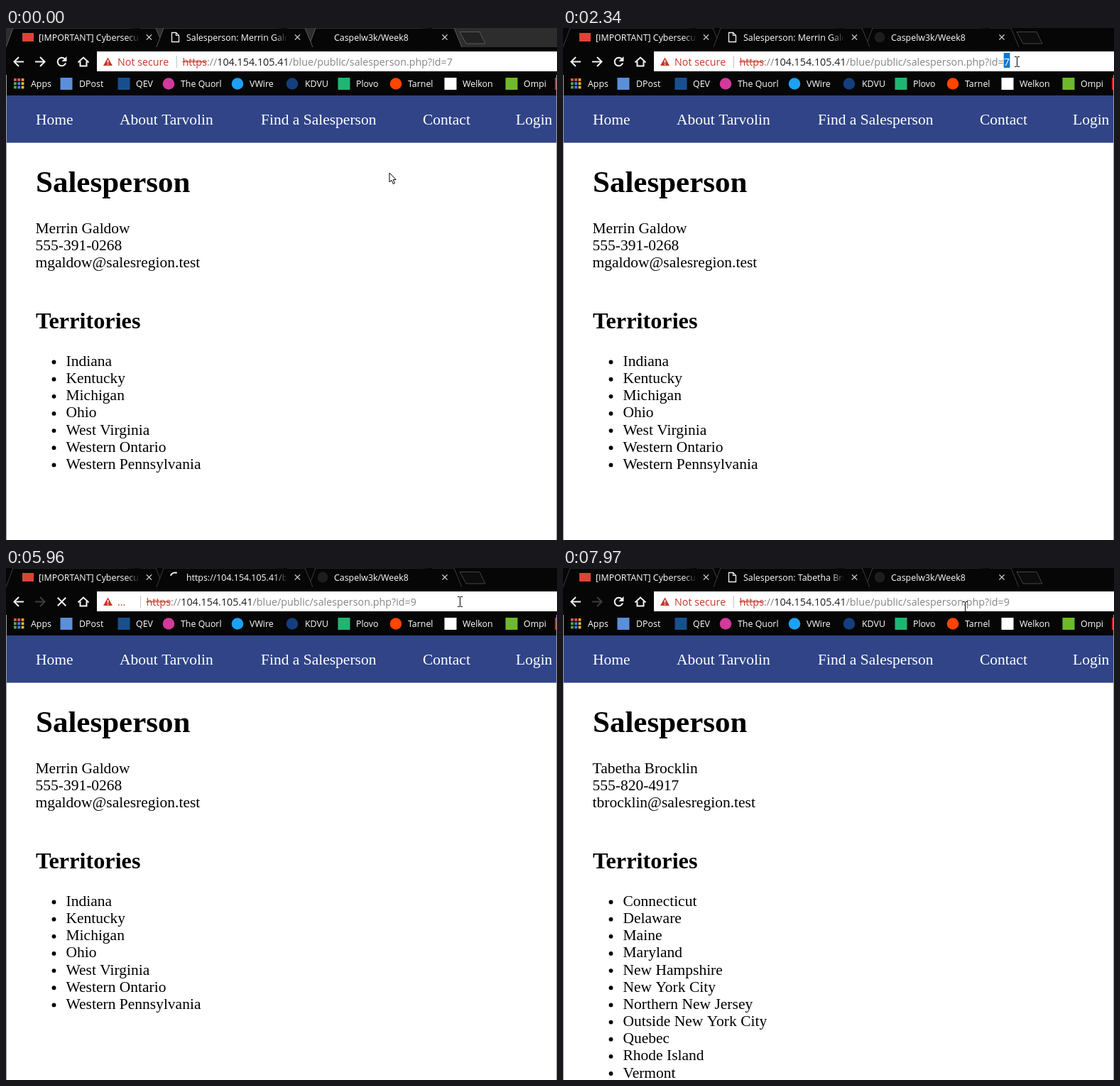
An HTML page with a canvas for the animation above (8000 ms loop, 776 by 721 pixels).

```html
<!DOCTYPE html>
<html lang="en">
<head>
<meta charset="utf-8">
<style>
html, body { margin: 0; width: 100%; height: 100%; overflow: hidden; background: #fff; }
canvas { display: block; }
</style>
</head>
<body>
<canvas width="776" height="721"></canvas>
<script>
const ctx = document.querySelector('canvas').getContext('2d');
const LOOP = 8000, W = 776, H = 721;
const UI = '"Open Sans", sans-serif', SERIF = '"Liberation Serif", serif';
const BLUE = '#0078d7', RED = '#c5392b', DARK = '#060606';

// Moments at which the state changes, in ms
const T = { focus: 1940, digit: 2340, typed: 4330, enter: 5550, chip: 5930, title: 6360, page: 6520, loaded: 7150 };

const people = [
  { name: 'Merrin Galdow', phone: '555-391-0268', mail: 'mgaldow@salesregion.test',
    places: ['Indiana', 'Kentucky', 'Michigan', 'Ohio', 'West Virginia', 'Western Ontario', 'Western Pennsylvania'] },
  { name: 'Tabetha Brocklin', phone: '555-820-4917', mail: 'tbrocklin@salesregion.test',
    places: ['Connecticut', 'Delaware', 'Maine', 'Maryland', 'New Hampshire', 'New York City', 'Northern New Jersey',
      'Outside New York City', 'Quebec', 'Rhode Island', 'Vermont'] }
];
const nav = [['Home', 42], ['About Tarvolin', 160], ['Find a Salesperson', 359], ['Contact', 587], ['Login', 718]];
// label, text x, icon centre x, icon colour, round icon
const bookmarks = [
  ['DPost', 103, 85, '#5b8fd9', 0], ['QEV', 183, 166, '#17508f', 0], ['The Quorl', 246, 229, '#d23a9b', 1],
  ['VWire', 343, 326, '#1da1f2', 1], ['KDVU', 421, 403, '#153e7c', 1], ['Plovo', 493, 476, '#1fb573', 0],
  ['Tarnel', 566, 549, '#ff4500', 1], ['Welkon', 643, 626, '#ffffff', 0], ['Ompi', 729, 712, '#6fb92c', 0]
];
// time, x, y of the pointer
const path = [[30, 540, 204], [730, 579, 160], [1150, 579, 160], [1160, 605, 101], [1300, 613, 74], [1500, 627, 37],
  [1770, 639, 47], [6360, 639, 47], [6440, 542, 102], [7150, 552, 70], [7210, 552, 13], [7400, 575, 13],
  [7550, 655, 14], [7750, 596, 88], [7970, 566, 54]];

function pointer(t) {
  const i = path.findIndex(p => p[0] > t);
  if (i === 0) return path[0].slice(1);
  if (i < 0) return path[path.length - 1].slice(1);
  const [t0, x0, y0] = path[i - 1], [t1, x1, y1] = path[i];
  const k = (t - t0) / (t1 - t0), e = k * k * (3 - 2 * k);
  return [Math.round(x0 + (x1 - x0) * e), Math.round(y0 + (y1 - y0) * e)];
}

function rect(x, y, w, h, color) { ctx.fillStyle = color; ctx.fillRect(x, y, w, h); }

function text(str, x, y, font, color) {
  ctx.font = font;
  ctx.fillStyle = color;
  ctx.fillText(str, x, y);
}

function line(points, color, width = 1, closed = false) {
  ctx.beginPath();
  points.forEach(([x, y]) => ctx.lineTo(x, y));
  if (closed) ctx.closePath();
  ctx.strokeStyle = color;
  ctx.lineWidth = width;
  ctx.stroke();
}

function fillPoly(points, color) {
  ctx.beginPath();
  points.forEach(([x, y]) => ctx.lineTo(x, y));
  ctx.fillStyle = color;
  ctx.fill();
}

function circle(x, y, r, color) {
  ctx.beginPath();
  ctx.arc(x, y, r, 0, 7);
  ctx.fillStyle = color;
  ctx.fill();
}

function arc(x, y, r, from, to, color, width) {
  ctx.beginPath();
  ctx.arc(x, y, r, from, to);
  ctx.strokeStyle = color;
  ctx.lineWidth = width;
  ctx.stroke();
}

function cross(x, y, r, color, width) {
  line([[x - r, y - r], [x + r, y + r]], color, width);
  line([[x - r, y + r], [x + r, y - r]], color, width);
}

function fileIcon(x, y, w, h, color) {
  const f = w * .4;
  line([[x, y], [x + w - f, y], [x + w, y + f], [x + w, y + h], [x, y + h]], color, 1.3, true);
  line([[x + w - f, y], [x + w - f, y + f], [x + w, y + f]], color, 1.2);
}

function drawPage(person) {
  rect(0, 95, W, H, '#fff');
  rect(0, 95, W, 66.6, '#304487');
  const body = '21.5px ' + SERIF, ink = '#000';
  nav.forEach(([label, x]) => text(label, x, 136, body, '#fff'));
  text('Salesperson', 42, 231, 'bold 43px ' + SERIF, ink);
  text('Territories', 42, 423, 'bold 32.25px ' + SERIF, ink);
  [person.name, person.phone, person.mail].forEach((s, i) => text(s, 41.5, 289 + i * 24.15, body, ink));
  person.places.forEach((s, i) => {
    const y = 476 + i * 24.15;
    circle(67.5, y - 5.5, 2.9, ink);
    text(s, 84.5, y, body, ink);
  });
}

function tabTitle(str, x, right) {
  ctx.save();
  ctx.beginPath();
  ctx.rect(x, 0, right - x, 27);
  ctx.clip();
  text(str, x, 17.5, '12.4px ' + UI, '#fff');
  const fade = ctx.createLinearGradient(right - 18, 0, right, 0);
  fade.addColorStop(0, 'rgba(6,6,6,0)');
  fade.addColorStop(1, DARK);
  rect(right - 18, 0, 18, 27, fade);
  ctx.restore();
}

function spinner(t) {
  const deg = Math.PI / 180;
  let from, sweep;
  if (t < T.title) {
    from = 200 - (t - 5960) * .36;
    sweep = 95;
  } else {
    from = -50 + (t - 6440) * .23;
    sweep = 150 + 130 * Math.cos((t - 6440) / 1333 * 2 * Math.PI);
  }
  arc(238, 13, 6.5, from * deg, (from + sweep) * deg, '#e8e8e8', 2.2);
}

function drawTabs(t, [mx, my]) {
  const active = t >= T.focus, edge = active ? '#3c3c3c' : '#5a5a5a';
  rect(0, 0, W, 27, active ? DARK : '#2d2d2d');
  [[0, 222], [426, 642], [212, 432]].forEach(([l, r]) => {
    const shape = [[l, 27], [l + 10, 0], [r - 11, 0], [r, 27]];
    fillPoly(shape, DARK);
    line(shape, edge);
  });
  if (my < 27 && mx > 437 && mx < 632) {
    const glow = ctx.createRadialGradient(mx, my, 0, mx, my, 80);
    glow.addColorStop(0, 'rgba(255,255,255,.16)');
    glow.addColorStop(1, 'rgba(255,255,255,0)');
    fillPoly([[430, 27], [437, 1], [631, 1], [641, 27]], glow);
  }
  const plus = [[639, 5.5], [667, 5.5], [675, 22], [648, 22]];
  const overPlus = my < 27 && mx > 640 && mx < 676;
  fillPoly(plus, overPlus ? '#444' : active ? '#0c0c0c' : '#222');
  line(plus, active ? '#444' : '#5a5a5a', 1, true);

  rect(23, 7, 16, 12, '#db4437');
  tabTitle('[IMPORTANT] Cybersecurity', 46, 188);
  const loading = t >= T.enter && t < T.loaded;
  if (loading) spinner(t);
  else fileIcon(233.5, 6.5, 10, 13, '#f0f0f0');
  const title = t < T.enter ? 'Salesperson: ' + people[0].name
    : t < T.title ? 'https://104.154.105.41/blue' : 'Salesperson: ' + people[1].name;
  tabTitle(title, 254, 396);
  if (active) circle(446, 13, 7.5, '#1b1d20');
  tabTitle('Caspelw3k/Week8', 462, 600);
  [201.5, 410.5, 618].forEach(x => cross(x, 13, 3.6, '#d8d8d8', 1.3));
}

function arrowIcon(x, dir, color) {
  line([[x - dir * 7, 47.5], [x + dir * 6, 47.5]], color, 2);
  line([[x, 41], [x + dir * 6.5, 47.5], [x, 54]], color, 2);
}

function drawButtons(t) {
  const ink = '#f4f4f4';
  arrowIcon(18, -1, ink);
  arrowIcon(48, 1, t < T.enter ? ink : '#3d3d3d');
  if (t >= T.enter && t < T.loaded) cross(78.5, 47.5, 5.7, ink, 2);
  else {
    arc(78.5, 47.5, 5.8, .3, 5.5, ink, 2);
    fillPoly([[85.5, 40], [85.5, 47], [78.5, 47]], ink);
  }
  line([[101.5, 48.5], [109, 41.5], [116.5, 48.5]], ink, 2);
  line([[104.5, 47], [104.5, 53.5], [113.5, 53.5], [113.5, 47]], ink, 2);
}

function drawUrl(x, digit, strike, font, white) {
  const grey = '#858585';
  ctx.font = font;
  const scheme = ctx.measureText('https').width;
  const parts = [['https', strike ? RED : grey], ['://', grey], ['104.154.105.41', '#1c1c1c'],
    ['/blue/public/salesperson.php?id=' + digit, grey]];
  let end = x;
  parts.forEach(([s, color]) => {
    text(s, end, 53, font, white ? '#fff' : color);
    end += ctx.measureText(s).width;
  });
  if (strike && !white) rect(x, 47, scheme, 1.2, RED);
  return end;
}

function drawChip(sep) {
  const font = '14.3px ' + UI, room = sep - 168;
  fillPoly([[143.5, 41.5], [150, 53], [137, 53]], RED);
  rect(142.8, 45, 1.5, 4, '#fff');
  rect(142.8, 50.2, 1.5, 1.5, '#fff');
  ctx.font = font;
  let label = 'Not secure';
  if (sep < 240) {
    let n = label.length;
    while (n && ctx.measureText(label.slice(0, n) + '...').width > room) n--;
    label = label.slice(0, n) + '...';
  }
  text(label, 157, 53, font, RED);
  rect(sep, 39, 1, 17, '#c4c4c4');
}

function drawAddress(t) {
  const font = '14.3px ' + UI;
  rect(128, 33, W, 28, '#fff');
  if (t >= T.typed && t < T.chip) {
    fileIcon(138.5, 41.5, 8, 11, '#6a6a6a');
    const end = drawUrl(157, 9, false, font);
    const blink = t < 4850 || t >= 5340;
    if (t < T.enter && blink) rect(Math.round(end), 35, 1, 21, '#000');
    return;
  }
  const sep = t < T.chip ? 240 : Math.min(240, Math.round(180 + (t - T.chip) * .3));
  drawChip(sep);
  const x = sep + 8.5, selectAll = t >= T.focus && t < T.digit;
  ctx.font = font;
  if (selectAll) rect(248, 35, 382, 21, BLUE);
  const end = drawUrl(x, t < T.typed ? 7 : 9, true, font, selectAll);
  if (t >= T.digit && t < T.typed) {
    const w = ctx.measureText('7').width;
    rect(end - w, 35, w + .5, 21, BLUE);
    text('7', end - w, 53, font, '#fff');
  }
}

function drawBookmarks([mx, my]) {
  if (mx > 538 && mx < 611 && my > 64 && my < 92) rect(539, 65, 72, 27, '#2a2a2a');
  const font = '12.4px ' + UI;
  const dots = ['#e2574c', '#e2574c', '#f0a030', '#4caf50', '#4285f4', '#f0b93a', '#4caf50', '#4285f4', '#f0b93a'];
  dots.forEach((c, i) => rect(11 + i % 3 * 5.3, 71 + Math.floor(i / 3) * 5.3, 3.8, 3.8, c));
  text('Apps', 35, 83, font, '#fff');
  bookmarks.forEach(([label, x, cx, color, round]) => {
    if (round) circle(cx, 78.5, 8.3, color);
    else rect(cx - 8.5, 70, 17, 17, color);
    text(label, x, 83, font, '#fff');
  });
  rect(773, 70, 2, 17, '#e02020');
}

function drawSuggestions(t) {
  const url = 'https://104.154.105.41/blue/public/salesperson.php?id=9', font = '14.3px ' + UI;
  rect(0, 66, W, 65, '#fff');
  rect(128, 71, W, 27, BLUE);
  fileIcon(138.5, 78.5, 8, 11, '#fff');
  text(url, 157, 89.5, 'bold 14.3px ' + UI, '#fff');
  text('-  Salesperson: ' + people[1].name, 573, 89.5, font, '#fff');
  arc(142, 110, 4, 0, 7, '#6a6a6a', 1.6);
  line([[145, 113], [149, 117]], '#6a6a6a', 1.8);
  text(url, 157, 116, font, '#1c1c1c');
  text('- Vennow Search', 543, 116, font, '#858585');
  if (t >= 4360) {
    const shade = ctx.createLinearGradient(0, 131, 0, 139);
    shade.addColorStop(0, 'rgba(0,0,0,.25)');
    shade.addColorStop(1, 'rgba(0,0,0,0)');
    rect(0, 131, W, 8, shade);
  }
}

function drawPointer([x, y]) {
  if (x > 128 && y > 32 && y < 61) {
    rect(x, y - 6, 1, 13, '#000');
    [-7, 7].forEach(d => {
      rect(x - 3, y + d, 3, 1, '#000');
      rect(x + 1, y + d, 3, 1, '#000');
    });
    return;
  }
  const shape = [[0, 0], [0, 13], [3, 10.4], [5.3, 15.6], [7.5, 14.6], [5.3, 9.6], [9.2, 9.6]]
    .map(([dx, dy]) => [x + dx, y + dy]);
  fillPoly(shape, '#fff');
  line(shape, '#000', 1, true);
}

function draw(t) {
  const mouse = pointer(t);
  drawPage(people[t < T.page ? 0 : 1]);
  rect(0, 27, W, 68, DARK);
  drawTabs(t, mouse);
  drawButtons(t);
  drawAddress(t);
  drawBookmarks(mouse);
  if (t >= T.typed && t < T.enter) drawSuggestions(t);
  [0, 775].forEach(x => rect(x, 66, 1, H, '#a0a0a0'));
  drawPointer(mouse);
}

function frame() {
  draw(performance.now() % LOOP);
  requestAnimationFrame(frame);
}
frame();
</script>
</body>
</html>
```
